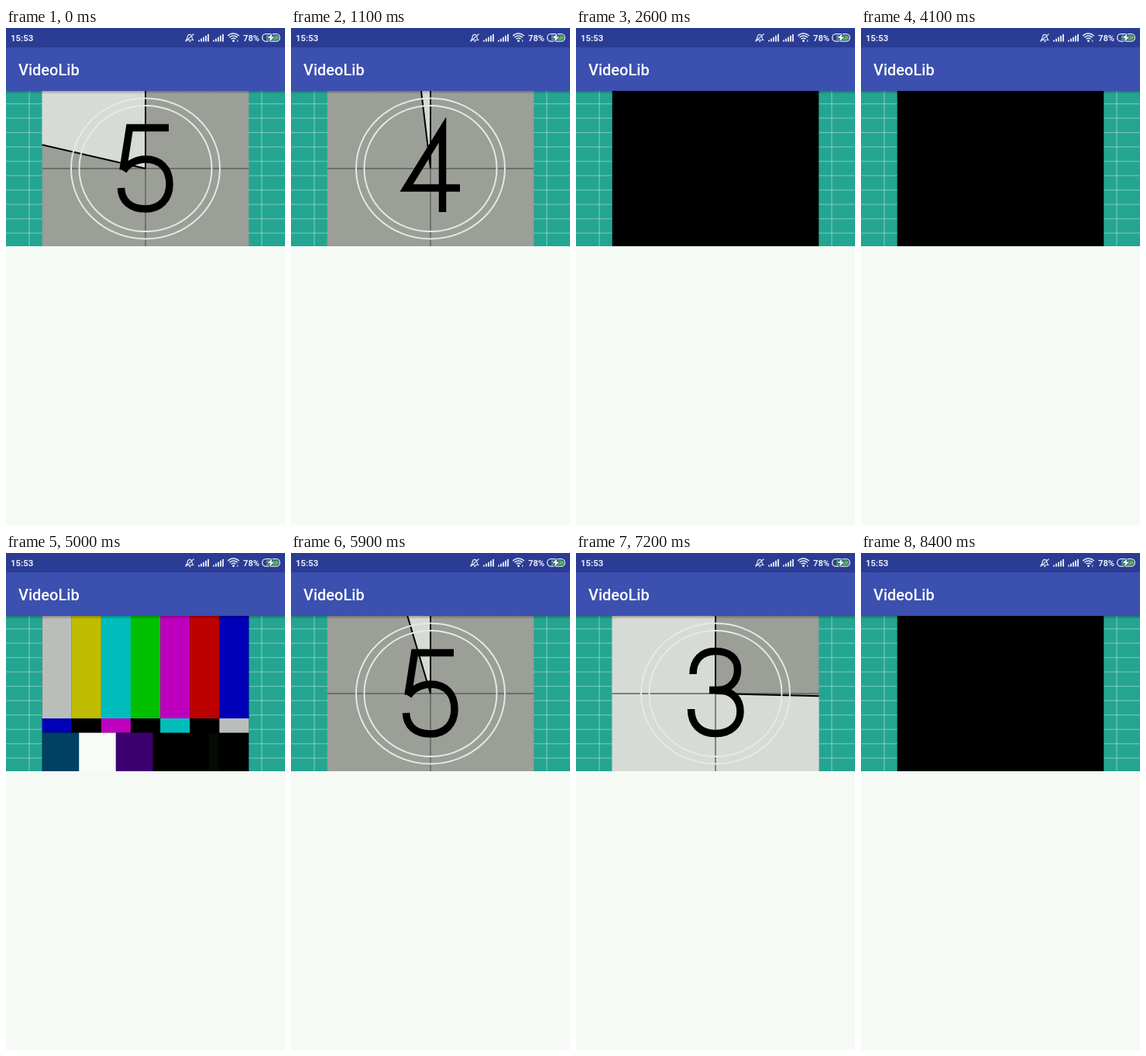
These frames come from a looping animation (360 px wide and 640 px high, 8.5 s). An HTML page with a canvas:

```html
<!DOCTYPE html>
<html lang="en">
<head>
<meta charset="utf-8">
<title>VideoLib</title>
<style>
html, body { margin: 0; width: 100%; height: 100%; overflow: hidden; background: #f5faf5; }
canvas { display: block; }
</style>
</head>
<body>
<canvas id="stage" width="360" height="640"></canvas>
<script>
const ctx = document.getElementById('stage').getContext('2d');
const LOOP = 8500, STEP = 100;
const VIDEO = { x: 46.5, y: 81, w: 267, h: 200 };
const CENTER = { x: 180, y: 181 };

const DIGITS = {
  5: 'M210 128.5H159.5L151 183M151.5 184C157 175 168 169 180 169C199 169 211 181 211 201C211 220 199 233 180 233C161 233 149 223 148.5 206',
  4: 'M195.5 237V131L149 206H218',
  3: 'M151 156C151 138 162 126.5 180 126.5C198 126.5 208.5 136 208.5 150C208.5 166 198 176.5 182 176.5H172M182 176.5C201 176.5 212 188 212 204C212 221 199 232.5 180 232.5C161 232.5 148.5 221 148.5 201',
  2: 'M150 158C150 139 161 126.5 180 126.5C198 126.5 210 137 210 154C210 186 153 190 149 232H214'
};
for (const key in DIGITS) DIGITS[key] = new Path2D(DIGITS[key]);

const SILVER = '#babeba', CYAN = '#00bdbb', MAGENTA = '#be00be', BLUE = '#0000b9', BLACK = '#000';
const BARS = [
  { y: 81, h: 132, colors: [SILVER, '#bebc00', CYAN, '#00c000', MAGENTA, '#bd0000', BLUE] },
  { y: 213, h: 18.5, colors: [BLUE, BLACK, MAGENTA, BLACK, CYAN, BLACK, SILVER] }
];

function rect(color, x, y, w, h) {
  ctx.fillStyle = color;
  ctx.fillRect(x, y, w, h);
}

function line(color, width, x1, y1, x2, y2) {
  ctx.strokeStyle = color;
  ctx.lineWidth = width;
  ctx.beginPath();
  ctx.moveTo(x1, y1);
  ctx.lineTo(x2, y2);
  ctx.stroke();
}

function ring(rx, ry) {
  ctx.strokeStyle = '#e5eae4';
  ctx.lineWidth = 1.9;
  ctx.beginPath();
  ctx.ellipse(CENTER.x, CENTER.y, rx, ry, 0, 0, 2 * Math.PI);
  ctx.stroke();
}

function strokePath(path, color, width) {
  ctx.strokeStyle = color;
  ctx.lineWidth = width;
  ctx.stroke(new Path2D(path));
}

function text(str, x, y, font, color) {
  ctx.font = font + ' Roboto, sans-serif';
  ctx.fillStyle = color;
  ctx.fillText(str, x, y);
}

function drawBackdrop() {
  rect('#f5faf5', 0, 0, 360, 640);
  rect('#24a592', 0, 81, 360, 200);
  const grid = 'rgba(255,255,255,.32)';
  for (let i = 0; i < 10; i++) line(grid, 1.2, 0, 97.7 + i * 18.5, 360, 97.7 + i * 18.5);
  for (const x of [30, 330]) line(grid, 1.4, x, 81, x, 281);
}

function drawBars() {
  const cell = VIDEO.w / 7, wide = cell * 1.25;
  rect(BLACK, VIDEO.x, VIDEO.y, VIDEO.w, VIDEO.h);
  for (const row of BARS) {
    row.colors.forEach((color, i) => rect(color, VIDEO.x + i * cell, row.y, cell + .1, row.h));
  }
  ['#004062', '#f8fbf7', '#3c006f'].forEach((color, i) =>
    rect(color, VIDEO.x + i * wide, 231.5, wide, 49.5));
  rect('#040a04', 262, 231.5, 12, 49.5);
}

function drawCountdown(count, phase) {
  const { x, y } = CENTER;
  const angle = phase * 2 * Math.PI - Math.PI / 2;
  rect('#9b9f98', VIDEO.x, VIDEO.y, VIDEO.w, VIDEO.h);
  ctx.fillStyle = '#d6dbd5';
  ctx.beginPath();
  ctx.moveTo(x, y);
  ctx.arc(x, y, 200, angle, Math.PI * 1.5);
  ctx.fill();
  line('#5c605b', 1.4, VIDEO.x, y, VIDEO.x + VIDEO.w, y);
  line('#5c605b', 1.4, x, VIDEO.y, x, VIDEO.y + VIDEO.h);
  line(BLACK, 2, x, y, x, VIDEO.y);
  line(BLACK, 2, x, y, x + 200 * Math.cos(angle), y + 200 * Math.sin(angle));
  ring(96, 90.5);
  ring(85.5, 81);
  ctx.strokeStyle = BLACK;
  ctx.lineWidth = 9.5;
  ctx.stroke(DIGITS[count]);
}

function drawVideo(t) {
  ctx.save();
  ctx.beginPath();
  ctx.rect(VIDEO.x, VIDEO.y, VIDEO.w, VIDEO.h);
  ctx.clip();
  if (t < 600) {
    drawCountdown(5, .786);
  } else if (t >= 4200 && t < 5100) {
    drawBars();
  } else {
    // Seconds elapsed since the "5" of the current playback began.
    const seconds = (t < 4200 ? t + 881 : t - 4946) / 1000;
    const count = 5 - Math.floor(seconds);
    if (seconds < 3.06) drawCountdown(count, seconds % 1);
    else rect(BLACK, VIDEO.x, VIDEO.y, VIDEO.w, VIDEO.h);
  }
  ctx.restore();
}

function drawSignal(x) {
  for (let i = 0; i < 5; i++) {
    const h = 2 + i * 1.9;
    rect('#e4e9f5', x + i * 3, 17.5 - h, 1.9, h);
  }
}

function drawWifi() {
  ctx.strokeStyle = '#e4e9f5';
  ctx.lineWidth = 1.5;
  for (const r of [4, 7, 10]) {
    ctx.beginPath();
    ctx.arc(293.5, 17, r, -Math.PI * .76, -Math.PI * .24);
    ctx.stroke();
  }
  ctx.fillStyle = '#e4e9f5';
  ctx.beginPath();
  ctx.arc(293.5, 16.5, 1.5, 0, 2 * Math.PI);
  ctx.fill();
  rect('#aab4da', 298, 15, 1.3, 3);
}

function drawBattery() {
  ctx.strokeStyle = '#e4e9f5';
  ctx.lineWidth = 1.3;
  ctx.beginPath();
  ctx.roundRect(330.7, 7.7, 22.6, 9.4, 4.7);
  ctx.stroke();
  ctx.fillStyle = '#55b84b';
  ctx.beginPath();
  ctx.roundRect(336, 9.4, 15.8, 6, [0, 3, 3, 0]);
  ctx.fill();
  const bolt = new Path2D('M343.5 7L337.5 13H341L339.8 18L346 11.5H342.5Z');
  ctx.strokeStyle = '#2b3c95';
  ctx.lineWidth = 1.4;
  ctx.stroke(bolt);
  ctx.fillStyle = '#fff';
  ctx.fill(bolt);
}

function drawHeader() {
  const shadow = ctx.createLinearGradient(0, 81, 0, 85);
  shadow.addColorStop(0, 'rgba(0,0,0,.28)');
  shadow.addColorStop(1, 'rgba(0,0,0,0)');
  rect(shadow, 0, 81, 360, 4);
  rect('#2b3c95', 0, 0, 360, 25);
  rect('#3b50af', 0, 25, 360, 56);
  text('VideoLib', 16, 61, '500 20px', '#fff');
  text('15:53', 6, 17, '700 11.4px', '#e8ecf6');
  text('78%', 306, 17, '700 11.2px', '#e8ecf6');
  strokePath('M232.5 15.5C235 13.5 233 8.5 237 8.3C241 8.5 239 13.5 241.5 15.5ZM236 17.3H238.5M231.5 17.5L242.5 7.5', '#dce2f2', 1.2);
  drawSignal(248);
  drawSignal(267);
  drawWifi();
  drawBattery();
}

function render(now) {
  const t = Math.floor((now % LOOP) / STEP) * STEP;
  drawBackdrop();
  drawVideo(t);
  drawHeader();
}

const start = performance.now();
function tick() {
  render(performance.now() - start);
  requestAnimationFrame(tick);
}
tick();
</script>
</body>
</html>
```
